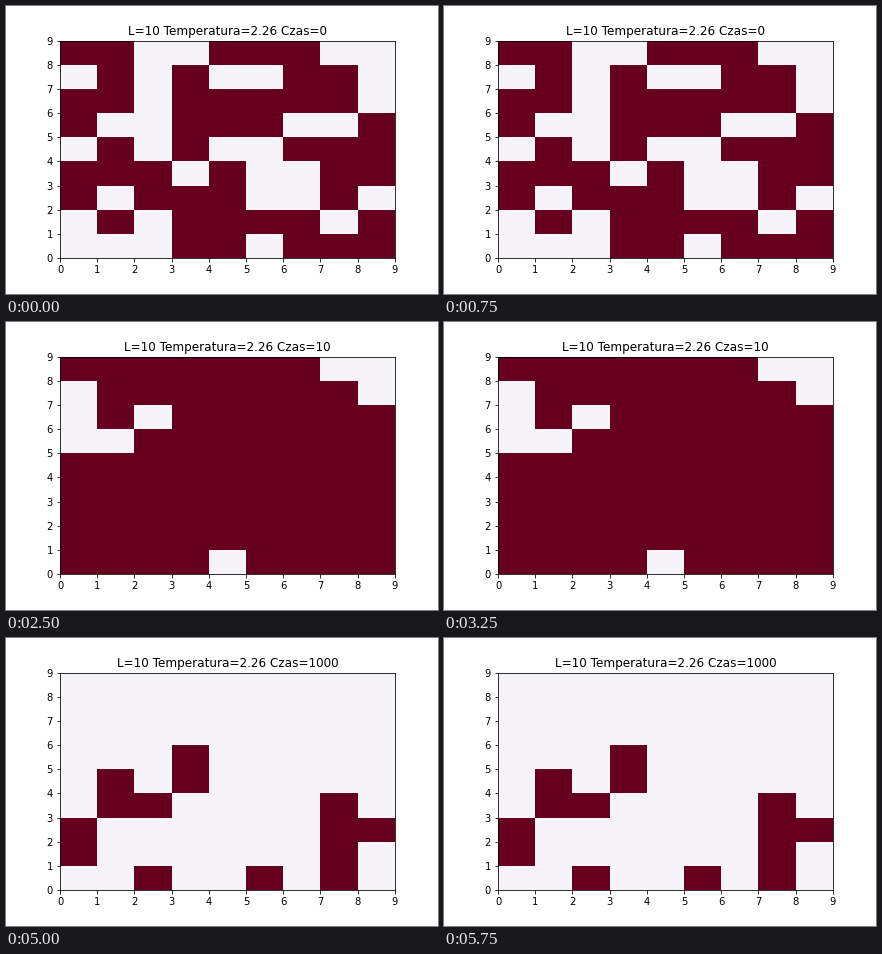
Recreate the animation shown at these times as a matplotlib script. Size 432 px wide and 288 px high, loop 6250 ms.

```python
import matplotlib.pyplot as plt
import numpy as np
from matplotlib.animation import FuncAnimation
from matplotlib.colors import ListedColormap

L = 10
TEMPERATURE = 2.26


def lattice(background, *domains):
    """Uniform spins with flipped domains (site, width=1, height=1)."""
    spins = np.full((L - 1, L - 1), background)
    for domain in domains:
        flip(spins, 1 - background, *domain)
    return spins


def flip(spins, value, site, width=1, height=1):
    y, x = divmod(site, L)
    spins[y:y + height, x:x + width] = value


start = lattice(1, (0, 3), (5,), (10,), (12,), (17,), (21,), (25, 2, 2),
                (28,), (33,), (40,), (42, 1, 5), (44, 2), (51,), (56, 2),
                (68, 1, 3), (70,), (74, 2), (83,), (87,))
mixing = lattice(1, (1, 3), (16, 3, 2), (20, 2), (36, 1, 6), (45,),
                 (42, 1, 3), (57,), (60,), (68,), (71,), (73, 3), (77, 2, 2))
ordered = lattice(1, (4,), (50, 2), (60, 1, 2), (62,), (78,), (87, 2))
settled = lattice(1, (6,), (23, 2), (36,), (40,), (65, 2), (71,), (76,),
                  (80,), (87,))
reversed_ = lattice(0, (2,), (5,), (7, 1, 4), (10, 1, 2), (28,),
                    (31, 1, 2), (32,), (43, 1, 2))
states = [start, mixing, ordered, settled, reversed_]

fig, ax = plt.subplots(figsize=(6, 4), dpi=72)
fig.subplots_adjust(left=0.125, right=0.9, bottom=0.125, top=0.88)
edges = np.arange(L)
mesh = ax.pcolormesh(edges, edges, start, vmin=0, vmax=1,
                     cmap=ListedColormap(["#f7f4f9", "#67001f"]))
ax.set(xlim=(0, L - 1), ylim=(0, L - 1), xticks=edges, yticks=edges)
title = ax.set_title("")


def update(i):
    time = 10 ** (i - 1) if i else 0
    mesh.set_array(states[i])
    title.set_text(f"L={L} Temperatura={TEMPERATURE} Czas={time}")
    return mesh, title


anim = FuncAnimation(fig, update, frames=len(states), interval=1250,
                     repeat=True, repeat_delay=0)
plt.show()
```
